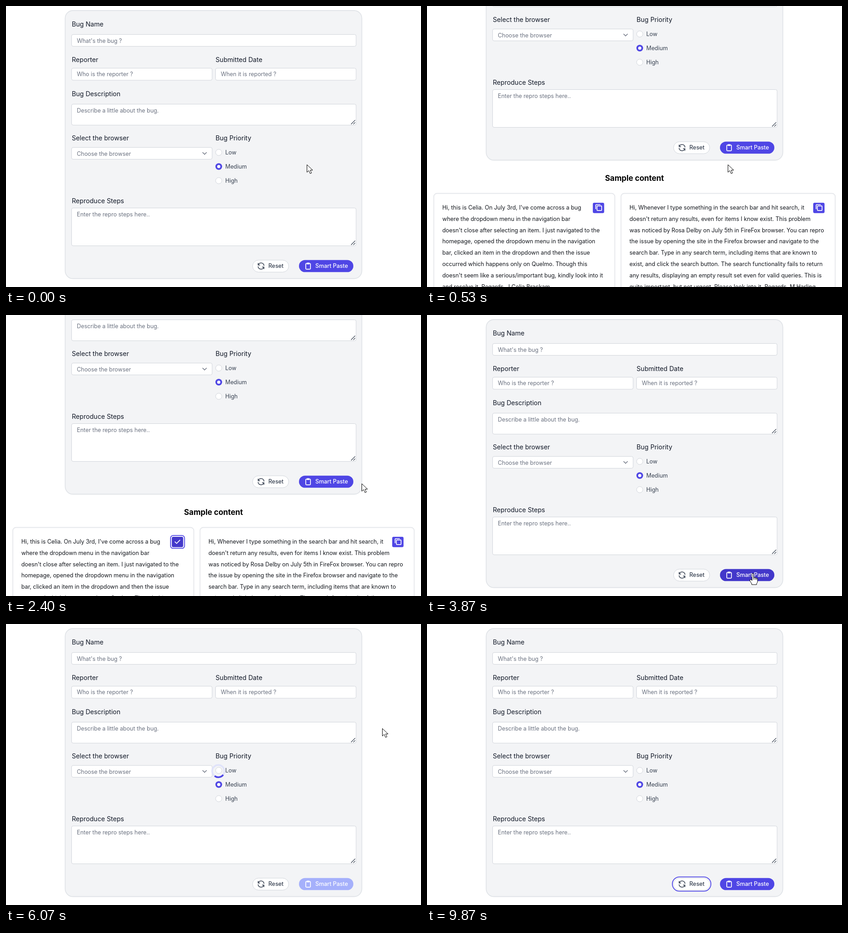
Animation of 908x617 px, one loop 9940 ms. Source, as an HTML page:

```html
<!DOCTYPE html>
<html lang="en">
<head>
<meta charset="utf-8">
<title>Bug report form</title>
<style>
  html, body { margin: 0; width: 100%; height: 100%; overflow: hidden; background: #fff; }
  svg { display: block; width: 908px; height: 617px; font: 12.4px Inter, "Open Sans", sans-serif; }
  text { white-space: pre; }
  .label { font-size: 14.1px; fill: #111827; }
  .title { font-size: 16.85px; font-weight: 700; text-anchor: middle; }
  .hint { fill: #6b7280; }
  .value { fill: #1f2937; }
  .option { fill: #374151; }
  .sample { fill: #15181e; }
  .button { font-weight: 500; fill: #374151; }
  .panel { fill: #f3f4f6; stroke: #e1e4e8; stroke-width: 1.8; }
  .card { fill: #fff; stroke: #e5e7eb; stroke-width: 1.8; }
  .box, .off { fill: #fff; stroke: #d1d5db; }
  .line { fill: none; stroke: #374151; stroke-width: 1.5; }
  .white { fill: none; stroke: #fff; stroke-width: 1.7; }
  .ring { fill: #fff; stroke: #4f46e5; stroke-width: 1.8; }
  .on, .brand { fill: #4f46e5; }
  .filled .box { stroke: #4caf50; }
  .value, .filled .hint { display: none; }
  .filled .value { display: inline; }
  .pointer { fill: #fff; stroke: #000; stroke-linejoin: round; }
</style>
</head>
<body>
<svg id="stage" viewBox="0 0 908 617"></svg>
<script>
const LOOP = 9940, STEP = 1000 / 15;

// x, y, width, height, baseline, hint, value lines
const fields = [
  [143.5, 62.5, 622.5, 26, 80.5, "What's the bug ?", ["Dropdown menu not closing"]],
  [143.5, 136.5, 307.5, 26.5, 154, "Who is the reporter ?", ["J Celia Brackam"]],
  [458.5, 136.5, 307.5, 26.5, 154, "When it is reported ?", ["July 3rd"]],
  [143.5, 215.5, 622.5, 46, 234, "Describe a little about the bug.",
    ["The dropdown menu in the navigation bar doesn't close after selecting an item."]],
  [143.5, 310.5, 307.5, 26, 329, "Choose the browser", ["Quelmo"]],
  [143.5, 443.5, 622.5, 83, 462, "Enter the repro steps here..",
    ["1. Navigate to the homepage. 2. Open the dropdown menu in the navigation bar. 3. Click an item in the",
     "dropdown.", "END_RESPONSE"]]
];
const labels = [
  [144, 44.5, "Bug Name"], [144, 122.5, "Reporter"], [458.5, 122.5, "Submitted Date"],
  [144, 197.6, "Bug Description"], [144, 295, "Select the browser"],
  [458.5, 295, "Bug Priority"], [144, 432.6, "Reproduce Steps"]
];
const samples = [
  [33.5, ["Hi, this is Celia. On July 3rd, I've come across a bug",
    "where the dropdown menu in the navigation bar",
    "doesn't close after selecting an item. I just navigated to the",
    "homepage, opened the dropdown menu in the navigation",
    "bar, clicked an item in the dropdown and then the issue",
    "occurred which happens only on Quelmo. Though this",
    "doesn't seem like a serious/important bug, kindly look into it",
    "and resolve it. Regards, J Celia Brackam"]],
  [443, ["Hi, Whenever I type something in the search bar and hit search, it",
    "doesn't return any results, even for items I know exist. This problem",
    "was noticed by Rosa Delby on July 5th in FireFox browser. You can repro",
    "the issue by opening the site in the Firefox browser and navigate to the",
    "search bar. Type in any search term, including items that are known to",
    "exist, and click the search button. The search functionality fails to return",
    "any results, displaying an empty result set even for valid queries. This is",
    "quite important, but not urgent. Please look into it. Regards, M Harling"]]
];

const text = (x, y, cls, s) => `<text x="${x}" y="${Math.round(y)}" class="${cls}">${s}</text>`;
const rect = (x, y, w, h, r, cls, more = "") =>
  `<rect x="${x}" y="${y}" width="${w}" height="${h}" rx="${r}" class="${cls}" ${more}/>`;
const path = (d, cls, more = "") => `<path d="${d}" class="${cls}" ${more}/>`;
const lines = (x, y, gap, cls, list) => list.map((s, i) => text(x, y + i * gap, cls, s)).join("");

const field = ([x, y, w, h, base, hint, value]) =>
  rect(x, y, w, h, 3.5, "box") + text(x + 11.5, base, "hint", hint) +
  lines(x + 11.5, base, 18.6, "value", value) +
  (h > 40 ? path(`M${x + w - 11} ${y + h - 2}l9-9m-4 9l4-4`, "line", 'style="stroke-width:1.2"') : "");

const radio = (name, i) => {
  const y = 321.5 + i * 31;
  return `<circle cx="465.5" cy="${y}" r="6.8" class="off"/>
    <g class="pick"><circle cx="465.5" cy="${y}" r="7.3" class="on"/>
    <circle cx="465.5" cy="${y}" r="3.5" fill="#fff"/></g>` + text(479.7, y + 4, "option", name);
};

const copyIcon = x => path(`M${x + 6.4} 706v-8.4q0-1.6 1.6-1.6h8.6`, "white") +
  rect(x + 9.2, 698.8, 10.2, 10.4, 1.4, "white");

document.getElementById("stage").innerHTML = `
  <g id="page">
    ${rect(129.5, 10, 649, 588.5, 17, "panel")}
    ${labels.map(([x, y, s]) => text(x, y, "label", s)).join("")}
    <g id="form">${fields.map(field).join("")}</g>
    ${path("M430 321.3l4.5 4.5 4.5-4.5", "line", 'style="stroke:#6b7280"')}
    ${["Low", "Medium", "High"].map(radio).join("")}
    <g id="spinner" fill="none" stroke-width="3.6">
      <circle cx="464.5" cy="323" r="13.4" stroke="#e0e3fa"/>
      <path id="arc" d="M474 332.5A13.4 13.4 0 0 1 455 332.5" stroke="#4f46e5"/>
    </g>
    ${rect(536.8, 555.4, 84.4, 31.2, 15.6, "ring", 'id="resetRing"')}
    ${rect(539.5, 558, 79, 26.3, 13.1, "box", 'id="reset"')}
    ${path("M-6.4-6.5v4.2h4.2M-6.1-2.5A6.5 6.5 0 0 1 6.5-.6M6.4 6.5v-4.2h-4.2M6.1 2.5A6.5 6.5 0 0 1-6.5.6",
      "line", 'transform="translate(558 571)"')}
    ${text(574, 575, "button", "Reset")}
    ${rect(641, 557.7, 119, 26.6, 13.3, "brand", 'id="smart"')}
    ${rect(655.8, 565.4, 10.4, 12.4, 1.6, "white")}
    ${rect(658, 563.4, 6, 3.8, 1, "", 'fill="#fff"')}
    ${text(676.7, 575, "button", "Smart Paste").replace("<text", '<text style="fill:#fff"')}
    ${text(454, 644, "title", "Sample content")}
    ${rect(14.9, 671.5, 396, 240, 7, "card")}
    ${rect(424.5, 671.5, 468.6, 240, 7, "card")}
    ${samples.map(([x, s]) => lines(x, 707, 24.8, "sample", s)).join("")}
    ${rect(360, 689.2, 30.6, 28.2, 5.5, "ring", 'id="copyRing"')}
    ${rect(362.8, 692, 24.8, 22.7, 3, "brand", 'id="copy"')}
    <g id="copyMark">${copyIcon(362.8)}</g>
    ${path("M369.3 702.6l4 4 7.6-7.8", "white", 'id="check"')}
    ${rect(845, 692, 24.8, 22.7, 3, "brand")}${copyIcon(845)}
  </g>
  <g id="cursor" class="pointer">
    <path d="M.5.5V17l4-3.6 3 6.6 3-1.3-2.9-6.3H13Z"/>
    <g>
      <path d="M-1.8 16V2a1.8 1.8 0 0 1 3.6 0V9.5q1.7-1.3 3.2.5 1.6-.9 2.8.8 2.4-.6 2.4 2V18q0 3-2 4.5V25H-2.5V23Q-5 19.5-6.5 16.5-7.3 13.5-5 13.8-3 14.3-1.8 16Z"/>
      <path fill="none" d="M1.8 9v5M5 10v4M7.8 11v3.5"/>
    </g>
    <path fill="none" d="M-3-9q3 0 3 2V7q0 2-3 2M3-9q-3 0-3 2M3 9q-3 0-3-2"/>
  </g>`;

const el = Object.fromEntries([...document.querySelectorAll("[id]")].map(e => [e.id, e]));
const picks = [...document.querySelectorAll(".pick")];
const shapes = [...el.cursor.children];

const scrollKeys = [[0, 0], [67, 20], [133, 80], [200, 140], [333, 205], [533, 260],
  [2333, 260], [2400, 205], [2467, 75], [2533, 0]];
const moveKeys = [[0, 658, 348], [800, 658, 348], [1700, 373, 446], [1810, 373, 446], [2330, 778, 370],
  [3133, 778, 370], [3400, 777, 450], [3600, 770, 540], [3867, 713, 567], [4000, 713, 567],
  [4333, 785, 490], [4733, 832, 290], [5000, 823, 229], [6533, 823, 229], [7533, 648, 448],
  [7930, 594, 563], [8000, 594, 563], [8200, 597, 566], [8400, 597, 566], [8930, 603, 640]];

function sample(keys, t, ease) {
  const i = keys.findIndex(k => k[0] > t);
  if (i < 0) return keys[keys.length - 1].slice(1);
  const a = keys[i - 1], b = keys[i];
  let u = (t - a[0]) / (b[0] - a[0]);
  if (ease) u = u * (1 + u * (1.5 - u) * 2) / 2;
  return a.slice(1).map((v, n) => v + (b[n + 1] - v) * u);
}

const show = (e, yes) => { e.style.display = yes ? "inline" : "none"; };
const inside = (x, y, l, t, w, h) => x >= l && x <= l + w && y >= t && y <= t + h;

function draw(time) {
  const t = Math.round(Math.floor((time % LOOP + 3.4) / STEP) * STEP);
  const [scroll] = sample(scrollKeys, t);
  const [x, y] = sample(moveKeys, t, true);
  const py = y + scroll;
  const busy = t >= 4067 && t < 6133;
  const filled = t >= 6133 && t < 8400;
  const copied = t >= 1733;
  const overCopy = inside(x, py, 363, 692, 25, 23);
  const overReset = inside(x, py, 539, 558, 80, 27);
  const overSmart = !busy && inside(x, py, 641, 557, 119, 27);
  const overField = fields.some(f => f[5] !== "Choose the browser" && inside(x, py, ...f.slice(0, 4)));

  el.page.setAttribute("transform", `translate(0 ${-Math.round(scroll)})`);
  el.form.setAttribute("class", filled ? "filled" : "");
  picks.forEach((p, i) => show(p, i === (filled ? 0 : 1)));

  show(el.spinner, busy);
  el.arc.setAttribute("transform", `rotate(${((t - 6067) * 0.36 - 8).toFixed(1)} 464.5 323)`);
  el.smart.style.fill = busy ? "#a5b0fb" : overSmart ? "#4338ca" : "#4f46e5";
  el.reset.style.fill = overReset ? "#f3f4f6" : "#fff";
  el.resetRing.style.opacity = t >= 9867 ? 1 : t >= 9800 ? 0.5 : 0;

  show(el.copyRing, t >= 1867);
  show(el.check, copied);
  show(el.copyMark, !copied);
  el.copy.style.fill = copied || overCopy ? "#4338ca" : "#4f46e5";

  const kind = overCopy || overReset || overSmart ? 1 : overField ? 2 : 0;
  shapes.forEach((s, i) => show(s, i === kind));
  el.cursor.setAttribute("transform", `translate(${Math.round(x)} ${Math.round(y)})`);
}

const start = performance.now();
function tick() {
  draw(performance.now() - start);
  requestAnimationFrame(tick);
}
tick();
</script>
</body>
</html>
```
